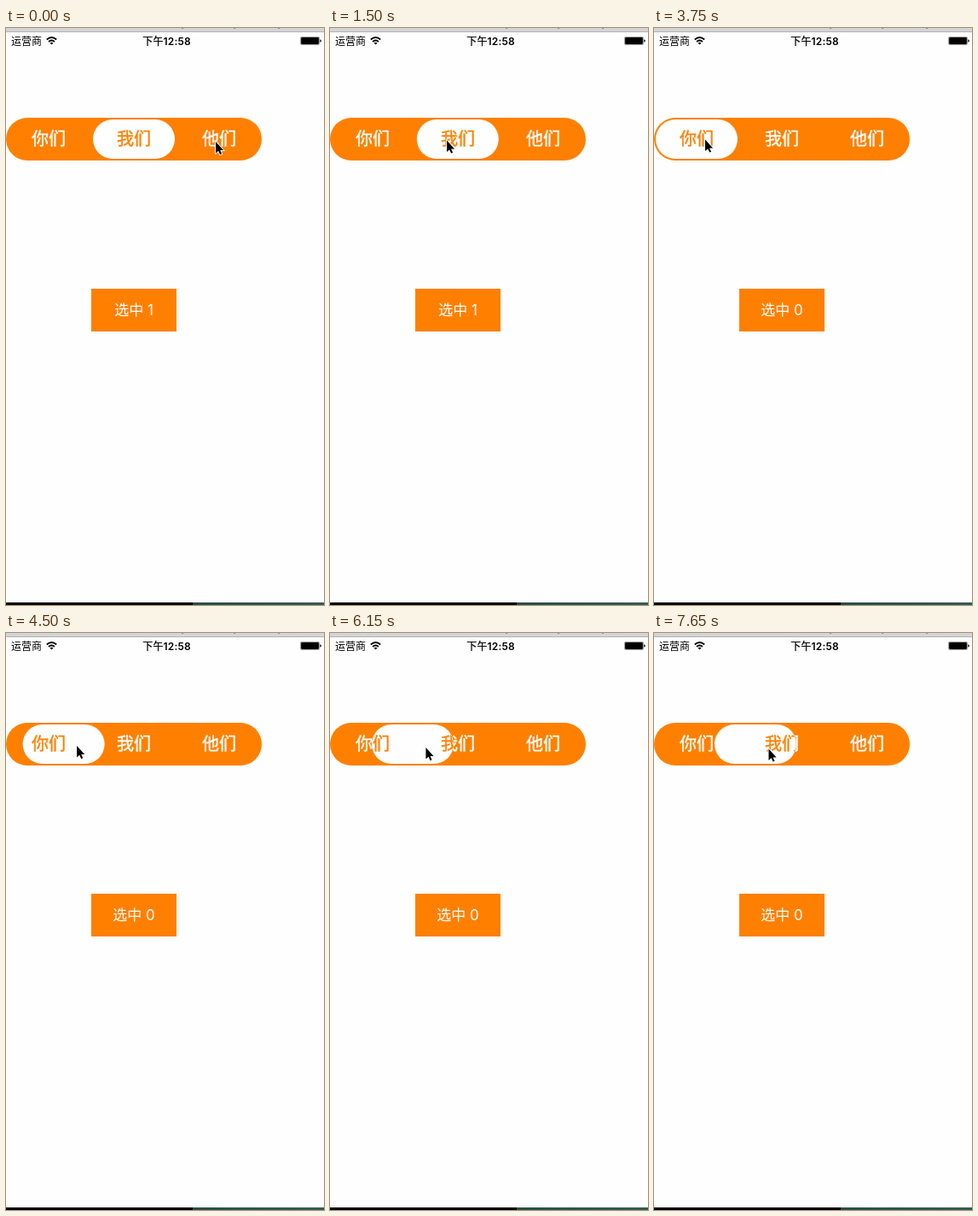
Recreate the animation shown at these times as an HTML page. Size 373 by 675 pixels, loop 8000 ms.

```html
<!DOCTYPE html>
<html lang="zh-CN">
<head>
<meta charset="utf-8">
<title>Segmented control</title>
<style>
  html, body { margin: 0; width: 100%; height: 100%; overflow: hidden; background: #fefefe; }
  svg { display: block; width: 373px; height: 675px; }
  text { font-family: Inter, "Noto Sans CJK SC", "Noto Sans CJK", sans-serif; }
  .status { font-size: 12px; }
  .time { letter-spacing: .2px; text-anchor: middle; stroke: #000; stroke-width: .25px; }
  .time tspan { font-weight: 600; stroke: none; }
  .tabs { font-size: 20px; text-anchor: middle; stroke-width: .45px; }
  .label { font-size: 17px; fill: #fff; text-anchor: middle; }
</style>
</head>
<body>
<svg viewBox="0 0 373 675">
  <defs>
    <clipPath id="track"><rect y="105" width="300" height="50" rx="25"/></clipPath>
    <clipPath id="thumb"><rect id="pill" x="102" y="107" width="96" height="46" rx="23"/></clipPath>
    <linearGradient id="desk"><stop stop-color="#2a4d45"/><stop offset="1" stop-color="#335c52"/></linearGradient>
    <g id="names">
      <text x="50" y="137.4">你们</text>
      <text x="150" y="137.4">我们</text>
      <text x="250" y="137.4">他们</text>
    </g>
  </defs>

  <!-- window edges -->
  <rect width="373" height="4" fill="#d4d4d4"/>
  <rect y="4" width="373" height="1" fill="#b4b4b4"/>
  <path d="M206 .5h2M267 .5h2M319 .5h2" stroke="#8c8c8c"/>
  <rect y="672" width="219" height="3"/>
  <rect x="219" y="672" width="154" height="3" fill="url(#desk)"/>

  <!-- status bar -->
  <text class="status" x="6" y="19.7">运营商</text>
  <text class="status time" x="188.6" y="19.7">下午<tspan>12:58</tspan></text>
  <g fill="none" stroke="#000" stroke-width="1.7">
    <path d="M47.8 13.5q5.7-5 11.4 0M50 16q3.5-3 7 0"/>
    <path d="M53.5 19.6l-2-2.1q2-1.6 4 0z" fill="#000" stroke="none"/>
  </g>
  <rect x="345.4" y="10.4" width="22.2" height="9.2" rx="1.5" fill="none" stroke="#777" stroke-width=".7"/>
  <rect x="346.1" y="11.1" width="20.8" height="7.8" rx=".8"/>
  <path d="M368.3 13.3q1.6 .4 1.6 1.7t-1.6 1.7z"/>

  <!-- segmented control -->
  <rect y="105" width="300" height="50" rx="25" fill="#ff8000"/>
  <use href="#names" class="tabs" fill="#fff" stroke="#fff"/>
  <g clip-path="url(#track)">
    <g clip-path="url(#thumb)">
      <rect y="105" width="300" height="50" fill="#fefefe"/>
      <use href="#names" class="tabs" fill="#ff8000" stroke="#ff8000"/>
    </g>
  </g>

  <rect x="100" y="305" width="100" height="50" fill="#ff8000"/>
  <text class="label" id="label" x="150" y="336.2">选中 1</text>

  <path id="cursor" d="M1 2v13.5l3.1-2.8 2 4.4 2-.9-2-4.2h4z" stroke="#fff" stroke-width="1.8" paint-order="stroke"/>
</svg>
<script>
  const LOOP = 8000, STEP = 150, DRAG_START = 3750, GRIP = 62.5;
  const $ = id => document.getElementById(id);
  const pill = $('pill'), label = $('label'), cursor = $('cursor');
  const restX = index => 2 + 100 * index;

  const home = { x: 245, y: 131 };
  const moves = [
    { start: 600, end: 1050, x: 136, y: 129.5 },
    { start: 1650, end: 1950, x: 65, y: 130.5 },
    { start: 3600, end: DRAG_START, x: 59, y: 128.5 },
    { start: DRAG_START, end: 4950, x: 96, y: 131 },
    { start: 5100, end: 7650, x: 133.5, y: 133.5 }
  ];
  const clicks = [
    { time: -LOOP, index: 1 },
    { time: 300, index: 2 },
    { time: 1050, index: 1 },
    { time: 2400, index: 0 }
  ];

  const mix = (a, b, k) => a + (b - a) * k;

  function pointerAt(t) {
    return moves.reduce((p, m) => {
      const k = Math.min(1, Math.max(0, (t - m.start) / (m.end - m.start)));
      return { x: mix(p.x, m.x, k), y: mix(p.y, m.y, k) };
    }, home);
  }

  // Damped spring: share of the way still to go; a click is seen 90 ms late.
  function spring(elapsed) {
    const s = elapsed + 90;
    return Math.exp(-s / 100) * Math.cos(s / 127);
  }

  function pillAt(t, pointer, current, previous) {
    if (t >= DRAG_START) return Math.max(restX(0), pointer.x - GRIP);
    return mix(restX(current.index), restX(previous.index), spring(t - current.time));
  }

  function draw() {
    const t = Math.floor(performance.now() % LOOP / STEP) * STEP;
    const [previous, current] = [clicks[0], ...clicks.filter(c => c.time <= t)].slice(-2);
    const pointer = pointerAt(t);
    pill.setAttribute('x', pillAt(t, pointer, current, previous));
    cursor.setAttribute('transform', `translate(${pointer.x} ${pointer.y})`);
    label.textContent = `选中 ${current.index}`;
    requestAnimationFrame(draw);
  }
  draw();
</script>
</body>
</html>
```
